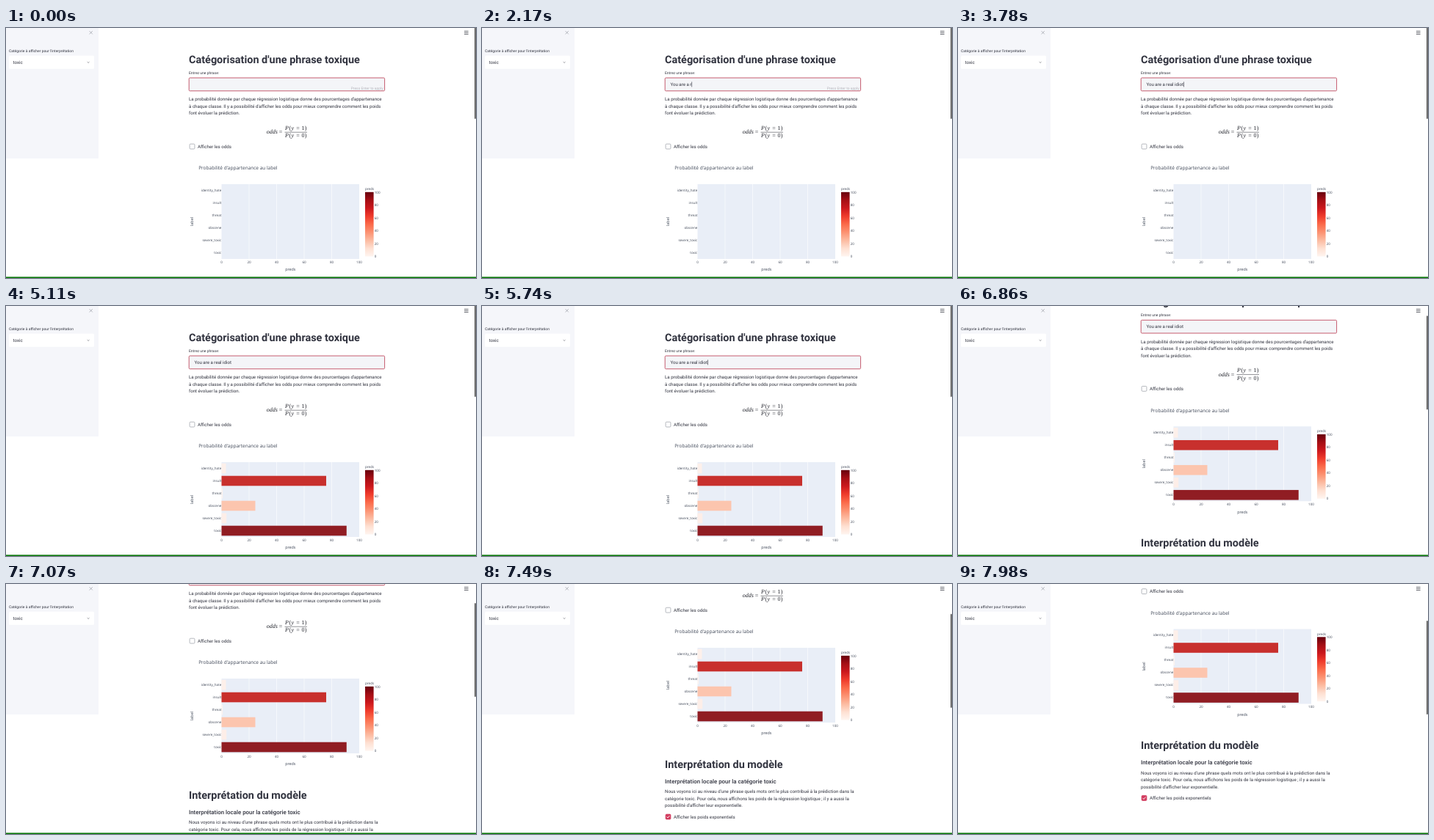
Animation, 640 px wide and 341 px high, one loop 8 s. Source, as an HTML page:

```html
<!DOCTYPE html>
<html lang="fr">
<head>
<meta charset="utf-8">
<title>Catégorisation</title>
<style>
  html, body { margin: 0; width: 100%; height: 100%; overflow: hidden; background: #fff; }
  svg { display: block; width: 100%; height: 100%; }
  text { font-family: Roboto, sans-serif; font-size: 6.16px; fill: #31333f; white-space: pre; text-rendering: geometricPrecision; }
  .title { font-size: 14.45px; font-weight: 700; }
  .sub { font-size: 7.9px; font-weight: 500; }
  .small { font-size: 5px; }
  .hint { font-size: 4.96px; fill: #b4b6bd; }
  .math { font-family: "Liberation Serif", serif; font-size: 8px; fill: #22242c; }
  .it { font-style: italic; }
  .chart { font-family: "Open Sans", sans-serif; font-size: 4.57px; fill: #3f4757; }
  .axis { font-size: 5.4px; }
  .heading { font-size: 6.5px; }
  .end { text-anchor: end; }
  .mid { text-anchor: middle; }
</style>
</head>
<body>
<svg id="stage" viewBox="0 0 640 341" preserveAspectRatio="none">
  <defs>
    <linearGradient id="reds" x1="0" y1="1" x2="0" y2="0"></linearGradient>
  </defs>
  <rect width="640" height="341" fill="#fff"/>
  <g id="page"></g>
  <g id="fixed"></g>
</svg>
<script>
const LOOP = 8000, STEP = 70;
const page = document.getElementById('page');
const fixed = document.getElementById('fixed');

function add(parent, tag, attrs, content) {
  const el = document.createElementNS('http://www.w3.org/2000/svg', tag);
  for (const key in attrs) el.setAttribute(key, attrs[key]);
  if (content !== undefined) el.textContent = content;
  parent.appendChild(el);
  return el;
}
const rect = (parent, x, y, width, height, fill, more) =>
  add(parent, 'rect', { x, y, width, height, fill, ...more });
const text = (parent, x, y, content, cls = '') =>
  add(parent, 'text', { x, y, class: cls }, content);
const line = (parent, d, stroke, width) =>
  add(parent, 'path', { d, stroke, 'stroke-width': width, fill: 'none' });
const paragraph = (y, lines) =>
  lines.forEach((s, i) => text(page, 249, y + i * 9.5, s));

// Form
text(page, 249, 48, "Catégorisation d'une phrase toxique", 'title');
text(page, 249, 63, 'Entrez une phrase:', 'small');
rect(page, 249.2, 68, 266.4, 17.8, '#f4f5f8', { rx: 1.3, stroke: '#c04a5e', 'stroke-width': 0.9 });
const typed = text(page, 256.4, 79, '');
const caret = rect(page, 256.4, 73.4, 0.6, 7, '#31333f');
const hint = text(page, 513.6, 84, 'Press Enter to apply', 'hint end');

paragraph(99.3, [
  "La probabilité donnée par chaque régression logistique donne des pourcentages d'appartenance",
  "à chaque classe. Il y a possibilité d'afficher les odds pour mieux comprendre comment les poids",
  'font évoluer la prédiction.'
]);

// Formula
text(page, 354.8, 144.3, 'odds', 'math it');
text(page, 371.8, 144.3, '=', 'math');
line(page, 'M379.5 142.2H410', '#22242c', 0.5);
[[139, '1'], [149.4, '0']].forEach(([y, n]) => {
  text(page, 380, y, 'P', 'math it');
  text(page, 385.6, y, '(', 'math');
  text(page, 388.6, y, 'y', 'math it');
  text(page, 395.2, y, '=', 'math');
  text(page, 402.4, y, n, 'math');
  text(page, 406.7, y, ')', 'math');
});

function checkbox(y, label, checked) {
  rect(page, 250.1, y - 3.4, 6.8, 6.8, checked ? '#d23c5f' : '#fff',
    { rx: 1.1, stroke: checked ? '#d23c5f' : '#a3a6ae', 'stroke-width': 0.8 });
  if (checked) line(page, `M251.6 ${y}l1.4 1.5 2.5 -3`, '#fff', 0.9);
  text(page, 261, y + 2.3, label);
}
checkbox(161.6, 'Afficher les odds', false);

// Chart
const X0 = 293.5, W = 187.5, Y0 = 213, H = 102;
text(page, 262.2, 193.3, "Probabilité d'appartenance au label", 'chart heading');
rect(page, X0, Y0, W, H, '#e9eef7');
for (let i = 0; i <= 5; i++) {
  const x = X0 + i * W / 5;
  if (i > 0 && i < 5) line(page, `M${x} ${Y0}v${H}`, '#fff', 0.6);
  text(page, x, 320.8, i * 20, 'chart mid');
  text(page, 501.7, 313.2 - i * 17.5, i * 20, 'chart');
}
const bars = add(page, 'g', {});
[
  ['identity_hate', 3.2, '#fdf0ea'],
  ['insult', 76, '#c8302d'],
  ['threat', 0.8, '#fdf3ee'],
  ['obscene', 24.5, '#fcc5ae'],
  ['severe_toxic', 3.6, '#fdeee8'],
  ['toxic', 90.8, '#901d23']
].forEach(([name, value, color], i) => {
  const y = Y0 + (i + 0.5) * H / 6;
  rect(bars, X0, y - 6.8, value * W / 100, 13.6, color);
  text(page, 293.3, y + 1.3, name, 'chart end');
});
text(page, 387.3, 331.3, 'preds', 'chart axis mid');
add(page, 'text', { class: 'chart axis mid', transform: 'translate(254.6 264) rotate(-90)' }, 'label');

['#fff5f0', '#fee0d2', '#fcbba1', '#fc9272', '#fb6a4a', '#ef3b2c', '#cb181d', '#a50f15', '#67000d']
  .forEach((c, i) => add(document.getElementById('reds'), 'stop', { offset: i / 8, 'stop-color': c }));
rect(page, 489, 223.8, 11.6, 87.8, 'url(#reds)');
text(page, 489, 221, 'preds', 'chart');

// Interpretation
text(page, 249, 376.6, 'Interprétation du modèle', 'title');
text(page, 249, 397.9, 'Interprétation locale pour la catégorie toxic', 'sub');
paragraph(411.2, [
  "Nous voyons ici au niveau d'une phrase quels mots ont le plus contribué à la prédiction dans la",
  'catégorie toxic. Pour cela, nous affichons les poids de la régression logistique ; il y a aussi la',
  "possibilité d'afficher leur exponentielle."
]);
checkbox(443.5, 'Afficher les poids exponentiels', true);

// Sidebar and window
rect(fixed, 0, 0, 126, 178, '#f5f6fa');
line(fixed, 'M113.6 4.2l4.2 4.2m0 -4.2l-4.2 4.2', '#a2a5ad', 0.8);
text(fixed, 4, 32.9, "Catégorie à afficher pour l'interprétation", 'small');
rect(fixed, 4, 37.8, 116, 18, '#fff', { rx: 1.5 });
text(fixed, 9.6, 49, 'toxic');
line(fixed, 'M110.7 46.2l1.4 1.3 1.4 -1.3', '#6a6d76', 0.7);
line(fixed, 'M624 4.3h5.6m-5.6 2.1h5.6m-5.6 2.1h5.6', '#4a4c55', 0.8);
const thumb = rect(fixed, 638, 0, 1.8, 128, '#5c5c5c', { rx: 0.9 });
rect(fixed, 0, 339.4, 640, 1.6, '#0a780a');

// Timeline
const PHRASE = 'You are a real idiot';
const KEYS = [
  [490, 1], [770, 2], [910, 3], [1120, 4], [1330, 5], [1540, 6], [1750, 7],
  [1960, 8], [2030, 9], [2100, 10], [2170, 11], [2240, 12], [2380, 13],
  [2450, 14], [2730, 16], [2870, 17], [3010, 18], [3290, 19], [3360, 20]
];
const SCROLL = [
  [6090, 0], [6300, 14], [6510, 25], [6650, 25], [6790, 37],
  [7070, 84], [7490, 126], [7980, 151.5]
];
const TYPED_AT = 3360, ENTER_AT = 3710, BARS_AT = 4060;

function scrollAt(t) {
  if (t <= SCROLL[0][0]) return 0;
  for (let i = 1; i < SCROLL.length; i++) {
    const [t0, y0] = SCROLL[i - 1], [t1, y1] = SCROLL[i];
    if (t <= t1) return y0 + (y1 - y0) * (t - t0) / (t1 - t0);
  }
  return SCROLL[SCROLL.length - 1][1];
}
const show = (el, on) => el.setAttribute('visibility', on ? 'visible' : 'hidden');

function draw(time) {
  const t = Math.floor((time % LOOP) / STEP) * STEP;
  let count = 0;
  for (const [at, n] of KEYS) if (t >= at) count = n;
  const value = PHRASE.slice(0, count);
  if (typed.textContent !== value) typed.textContent = value;
  caret.setAttribute('x', 256.4 + (value ? typed.getComputedTextLength() : 0));
  show(caret, t >= STEP && (t < TYPED_AT || (t - TYPED_AT) % 1000 < 500));
  show(hint, t < ENTER_AT);
  show(bars, t >= BARS_AT);

  const y = scrollAt(t);
  page.setAttribute('transform', `translate(0 ${-y})`);
  thumb.setAttribute('y', y * 0.356 - 4);
}

const start = performance.now();
function tick(now) {
  draw(Math.max(0, now - start));
  requestAnimationFrame(tick);
}
draw(0);
requestAnimationFrame(tick);
</script>
</body>
</html>
```
